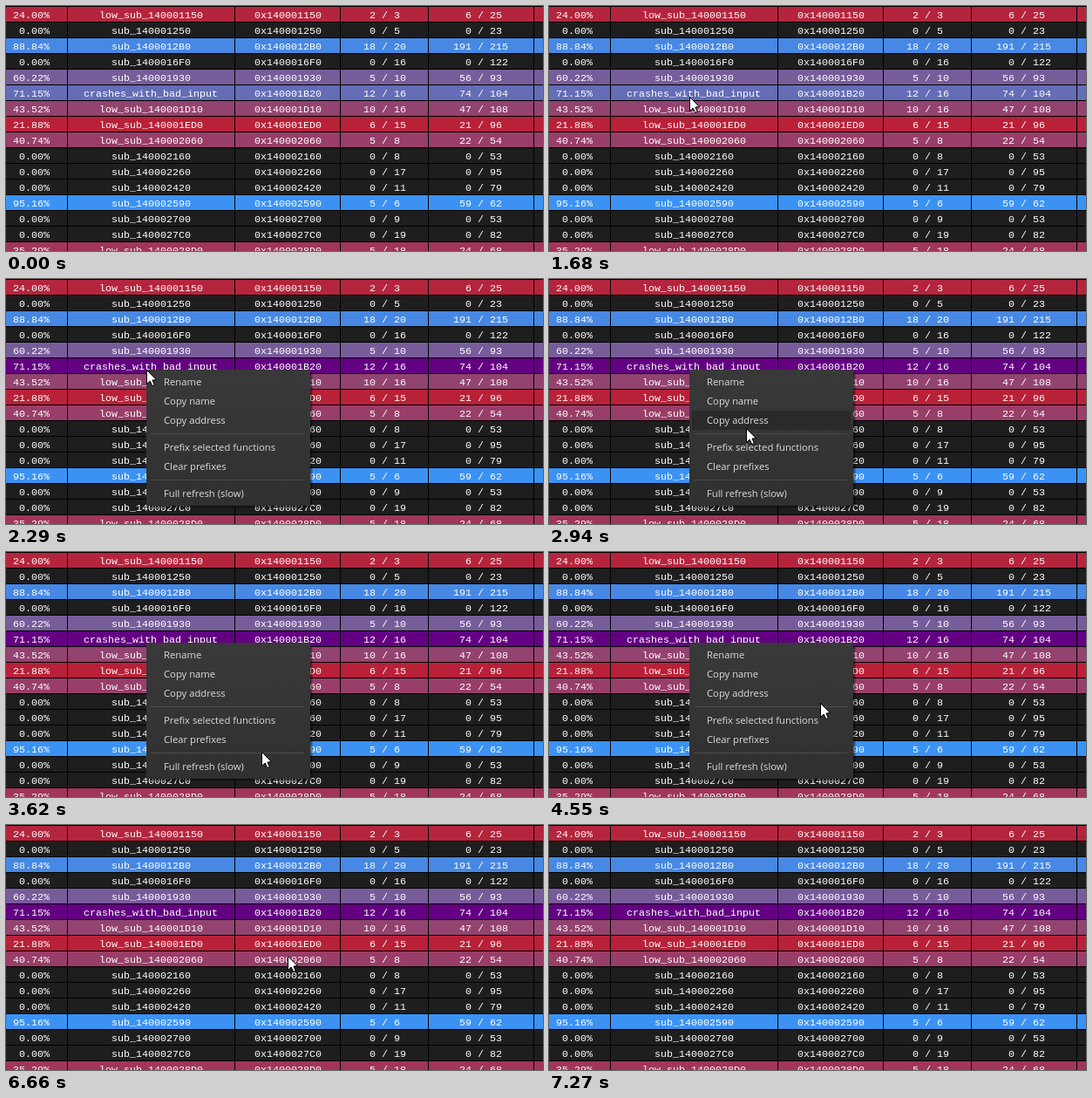
An HTML page with a canvas for the animation above (7950 ms loop, 616 px wide and 281 px high).

```html
<!DOCTYPE html>
<html lang="en">
<head>
<meta charset="utf-8">
<title>Coverage table</title>
<style>
  html, body { margin: 0; width: 100%; height: 100%; overflow: hidden; background: #000; }
  canvas { display: block; }
</style>
</head>
<body>
<canvas id="stage" width="616" height="281"></canvas>
<script>
const ctx = document.getElementById('stage').getContext('2d');
const W = 616, H = 281, LOOP = 7950;
const ROW_H = 18, CHAR_W = 7, PICKED = 5;
const MONO = '11.67px "Liberation Mono", monospace';
const UI = '11.25px "Open Sans", sans-serif';

// address, blocks hit / total, instructions hit / total
const rows = `
140001150 2/3 6/25
140001250 0/5 0/23
1400012B0 18/20 191/215
1400016F0 0/16 0/122
140001930 5/10 56/93
140001B20 12/16 74/104
140001D10 10/16 47/108
140001ED0 6/15 21/96
140002060 5/8 22/54
140002160 0/8 0/53
140002260 0/17 0/95
140002420 0/11 0/79
140002590 5/6 59/62
140002700 0/9 0/53
1400027C0 0/19 0/82
1400028D0 5/18 24/68`.trim().split('\n').map((line, i) => {
  const [addr, blocks, instr] = line.split(' ');
  const [hit, total] = instr.split('/');
  const ratio = hit / total;
  const prefix = ratio > 0 && ratio < 0.5 ? 'low_' : '';
  const name = i === PICKED ? 'crashes_with_bad_input' : prefix + 'sub_' + addr;
  return { addr, blocks, instr, ratio, name };
});

const menu = { x: 161, y: 104, w: 188, h: 156 };
const items = [
  ['Rename', 107], ['Copy name', 129], ['Copy address', 151],
  ['Prefix selected functions', 182], ['Clear prefixes', 204],
  ['Full refresh (slow)', 235]
];

const moves = [
  { a: 2550, b: 3310, n: 12, to: [290, 238] },
  { a: 3370, b: 3370, n: 1, to: [290, 239] },
  { a: 3520, b: 3940, n: 7, to: [304, 198] },
  { a: 4190, b: 4370, n: 3, to: [308, 181] },
  { a: 4520, b: 4550, n: 2, to: [311, 173] },
  { a: 4990, b: 5170, n: 4, to: [317, 165] },
  { a: 5360, b: 5660, n: 5, to: [323, 150] }
];

const mix = (a, b, p) => a + (b - a) * p;
const ease = p => (p + p * p * (3 - 2 * p)) / 2;

function stepAt(t, a, b, n) {
  if (t < a) return 0;
  if (t >= b) return n;
  return 1 + Math.floor((t - a) / (b - a) * (n - 1));
}

function pointer(t) {
  if (t < 1110 || t >= 7270) return null;
  if (t < 1680) {
    const p = ease((stepAt(t, 1110, 1680, 10) - 1) / 9), q = 1 - p;
    const curve = (a, c, b) => Math.round(q * q * a + 2 * p * q * c + p * p * b);
    return [curve(204, 90, 161), curve(204, 125, 104)];
  }
  let pos = [161, 104];
  for (const m of moves) {
    const p = ease(stepAt(t, m.a, m.b, m.n) / m.n);
    pos = pos.map((v, i) => Math.round(mix(v, m.to[i], p)));
  }
  const out = (stepAt(t, 7030, 7270, 5) / 4) ** 1.5;
  return [mix(pos[0], 577, out), mix(pos[1], 272, out)];
}

function rect(color, x, y, w, h) {
  ctx.fillStyle = color;
  ctx.fillRect(x, y, w, h);
}

function mono(text, x, y) {
  [...text].forEach((c, i) => ctx.fillText(c, x + i * CHAR_W, y));
}

function fraction(text, slashX, y) {
  const [hit, total] = text.split('/');
  mono(`${hit} / ${total}`, slashX - (hit.length + 1) * CHAR_W, y);
}

function rowColor(ratio) {
  if (!ratio) return '#1e1e1e';
  const c = [[221, 51], [0, 153], [0, 255]].map(([a, b]) => Math.round(mix(a, b, ratio)));
  return `rgb(${c})`;
}

function drawTable(picked) {
  rect('#000', 0, 0, W, H);
  rows.forEach((r, i) => {
    const y = 1 + i * ROW_H;
    rect(picked && i === PICKED ? 'rgb(100,0,130)' : rowColor(r.ratio), 0, y, W, ROW_H - 1);
  });
  for (const x of [70, 262, 383, 484, 605]) rect('#000', x, 0, 1, H);

  ctx.font = MONO;
  ctx.fillStyle = '#fff';
  rows.forEach((r, i) => {
    const y = 14 + i * ROW_H;
    const pct = (r.ratio * 100).toFixed(2) + '%';
    mono(pct, 50 - pct.length * CHAR_W, y);
    mono(r.name, Math.floor(166.5 - r.name.length * CHAR_W / 2), y);
    mono('0x' + r.addr, 285, y);
    fraction(r.blocks, 431, y);
    fraction(r.instr, 541, y);
  });
}

function drawMenu(alpha, tip) {
  const { x, y, w, h } = menu;
  ctx.save();
  ctx.globalAlpha = alpha;
  for (let i = 3; i > 0; i--) rect('rgba(0,0,0,0.2)', x + 4, y + 4, w - 4 + i, h - 4 + i);
  const shade = ctx.createLinearGradient(0, y, 0, y + h);
  shade.addColorStop(0, '#393939');
  shade.addColorStop(1, '#303030');
  rect(shade, x, y, w, h);
  for (const sepY of [177, 230]) rect('#4b4b4b', 166, sepY, 176, 1);

  ctx.font = UI;
  for (const [label, top] of items) {
    const over = tip && tip[0] > x + 2 && tip[1] >= top && tip[1] < top + 22;
    if (over) rect('#2a2a2a', x + 3, top, w - 6, 22);
    ctx.fillStyle = '#dcdcdc';
    ctx.fillText(label, 181, top + 15);
  }
  ctx.restore();
}

function drawPointer([x, y]) {
  ctx.save();
  ctx.translate(x + 0.5, y + 0.5);
  ctx.beginPath();
  ctx.moveTo(0, 0);
  for (const [px, py] of [[0, 16], [3.7, 12.6], [6.3, 18], [8.8, 17], [6.5, 11.5], [11, 11.2]]) {
    ctx.lineTo(px, py);
  }
  ctx.closePath();
  ctx.fillStyle = '#fff';
  ctx.strokeStyle = '#000';
  ctx.lineWidth = 1;
  ctx.fill();
  ctx.stroke();
  ctx.restore();
}

function menuAlpha(t) {
  if (t < 2170 || t >= 6660) return 0;
  if (t < 2230) return 0.2;
  if (t < 2260) return 0.6;
  return t < 2290 ? 0.8 : 1;
}

function draw(now) {
  const t = now % LOOP;
  const tip = pointer(t);
  const alpha = menuAlpha(t);
  drawTable(t >= 1990);
  if (alpha) drawMenu(alpha, tip);
  if (tip) drawPointer(tip);
}

const start = performance.now();
function tick() {
  draw(performance.now() - start);
  requestAnimationFrame(tick);
}
tick();
</script>
</body>
</html>
```
